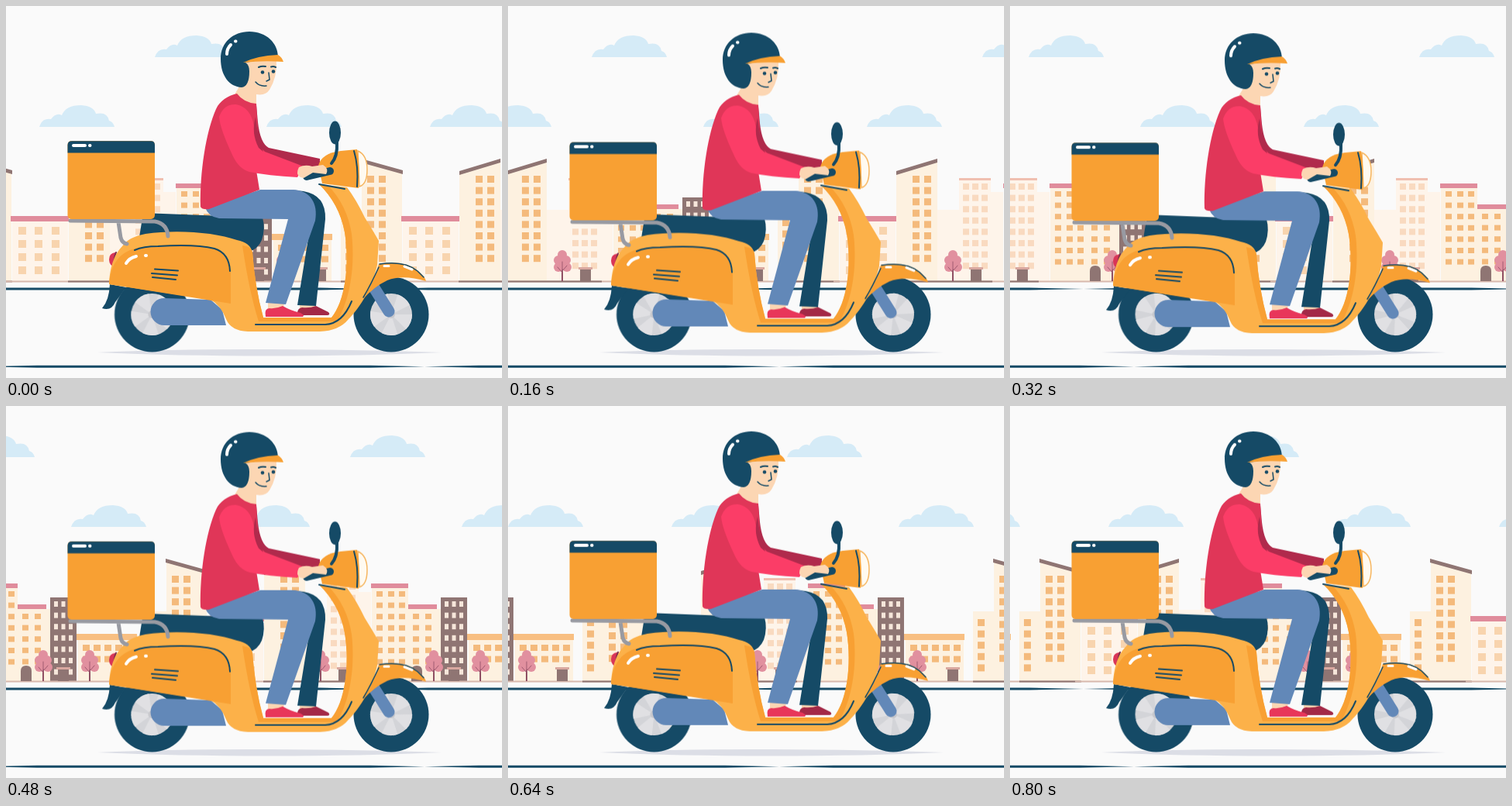
Animation of 640 by 480 pixels, one loop 960 ms. Source, as an HTML page:

```html
<!DOCTYPE html>
<html lang="en">
<head>
<meta charset="utf-8">
<title>Scooter delivery</title>
<style>
  html, body { margin: 0; width: 100%; height: 100%; overflow: hidden; background: #fafafa; }
  svg { display: block; width: 640px; height: 480px; }
  .line { fill: none; stroke-linecap: round; stroke-linejoin: round; }
  .navy { fill: #154a66; }
  .ink { stroke: #154a66; stroke-width: 2; }
  .shine { stroke: #fff; stroke-width: 4; }
  .amber { fill: #f8a033; }
  .gold { fill: #fcb149; }
  .skin { fill: #fcd6b3; }
  .blue { fill: #6288b8; }
</style>
</head>
<body>
<svg viewBox="0 0 640 480">
  <g id="town"></g>
  <g id="road"></g>
  <path d="M118 447Q220 442.500 340 443T562 447Q460 451.500 340 451.500T118 447Z" fill="#dcdee6"/>

  <g id="wheels"></g>

  <g id="rider">
    <!-- mudguard, exhaust, fork -->
    <path class="navy" d="M134 359Q133 380 124 390Q136 394 141 382L155 363Z"/>
    <path class="blue" d="M204 377L264 379L279 392L284 412H204A17.5 17.5 0 0 1 204 377Z"/>
    <path class="line" d="M474 362L494 394" stroke="#6288b8" stroke-width="15"/>

    <!-- far arm and far leg -->
    <path d="M323 128L325 150Q328 177 339 183L405 197V209L378 208L320 192Z" fill="#b02a4c"/>
    <path class="skin" d="M379 383H399V394H379Z"/>
    <path d="M376 399Q375 390 382 389Q392 390 400 387Q408 391 416 395Q419 398 415 399Z" fill="#a32947"/>
    <path class="navy" d="M366 237L384 239Q413 244 412 275L400 387L376 386L390 300Z"/>

    <!-- seat and body -->
    <path class="navy" d="M177 267L331 273Q335 287 330 302Q325 314 313 317L172 298Z"/>
    <path d="M141 318Q133 319 133 327T141 337Z" fill="#d93557"/>
    <path d="M142 318Q138 327 141 337" class="line" stroke="#7c2e48" stroke-width="2"/>
    <path class="gold" d="M133 359C134 334 141 319 150 310Q158 298 180 294C220 288 270 292 298 302Q315 305 318 318Q321 362 332 402H420C437 382 444 335 437 292Q430 255 404 230L440 234Q452 250 463 273Q473 289 481 303L479 334C473 362 458 388 442 404Q430 419 405 420H312Q290 419 284 404Q277 386 264 379Z"/>
    <path class="amber" d="M305 309Q317 310 318 318Q321 362 332 402H420C437 382 444 335 437 292Q430 255 404 230L416 232Q440 257 446 294C451 338 443 381 427 407H326Q314 370 305 309Z"/>
    <path class="amber" d="M133 359C135 335 145 314 177 311Q237 303 270 313Q288 319 290 345V384Z"/>
    <path class="line ink" d="M166 315Q177 310 196 310Q245 307 269 313Q288 319 289 342"/>
    <path class="line ink" d="M192 339.500L222 341.500M188 345L221 347.500M189 350L219 353"/>
    <path class="line shine" d="M155 332Q159 325 168 323M180 322h1"/>
    <path class="line ink" d="M322 411H412Q434 410 446 381"/>

    <!-- front fender -->
    <path class="amber" d="M461 378Q473 360 481 333Q515 327 533 343Q541 350 542 355Q512 346 492 354Q475 362 461 378Z"/>
    <path class="line ink" style="stroke-width:1.500" d="M481 337Q470 361 461 376M482 333Q514 328 531 342L539 350"/>
    <path class="line shine" style="stroke-width:3" d="M488 335.500h6M514 336l10 4"/>

    <!-- shoe, leg, torso -->
    <path class="skin" d="M338 381L359 384L357 393H338Z"/>
    <path d="M335 401Q333 390 340 390Q348 391 357 387Q367 393 380 396Q386 399 383 401Z" fill="#e8365a"/>
    <path class="blue" d="M257 260L328 237H370C393 238 403 255 399 277L361 385L335 383L364 275L275 274Q261 272 257 260Z"/>
    <path class="skin" d="M308 70H349Q350 92 340 108Q335 116 323 114V128Q304 127 295 114L304 99Z"/>
    <path d="M298 113C286 116 276 122 271 133C258 162 250 215 251 259Q253 263 262 262L327 237L322 206L325 165L323 126Q307 125 298 113Z" fill="#e03658"/>
    <path d="M297 127Q316 131 320 155Q322 178 334 188L384 207L376 221Q338 219 314 214Q300 210 292 192Q276 158 275 143Q281 126 297 127Z" fill="#fb3d67"/>
    <path d="M322 143Q316 164 326 183L332 188Q325 171 322 143Z" fill="#b02a4c"/>

    <!-- headlamp, mirror, grip -->
    <path d="M454 187Q466 192 466 211T456 233Z" fill="#fffaf0" stroke="#f6b660" stroke-width="1.500"/>
    <path class="amber" d="M403 206Q407 190 432 187L453 185Q457 209 455 235L408 229Z"/>
    <path class="line ink" d="M449 187Q455 207 453 233M404 230L437 236"/>
    <path class="line ink" style="stroke-width:4" d="M427 176Q428 194 420 203"/>
    <ellipse class="navy" cx="424.500" cy="163.500" rx="7.500" ry="15"/>
    <path class="line ink" style="stroke-width:10" d="M388 220L418 213"/>
    <path class="skin" d="M378 208Q386 204 395 207L409 205Q417 210 413 217L396 215L384 222Q372 220 378 208Z"/>

    <!-- head -->
    <path class="navy" d="M277 68C277 47 293 33 314 33C336 33 351 48 351 66L309 73Q314 76 314 84Q314 104 304 105C288 104 277 90 277 68Z"/>
    <path class="amber" d="M306 73Q324 64 351 63Q356 66 358 72Q331 70 306 73Z"/>
    <path class="line shine" d="M285 62Q285 55 290 50M296 45.500h.5"/>
    <g class="navy"><circle cx="331" cy="85.500" r="2.300"/><circle cx="345" cy="84.500" r="2.300"/></g>
    <path class="line ink" d="M326 79Q330 77 335 78M342 78.500Q345 77.500 348 79"/>
    <path class="line ink" style="stroke-width:1.500" d="M339 86L340 95L336 97M322 98Q327 104 336 103"/>

    <!-- delivery box -->
    <path class="line" d="M145 279L148 299Q150 306 156 307M83 277L192 278Q208 281 209 297" stroke="#989aa2" stroke-width="5"/>
    <rect class="amber" x="79.500" y="174" width="112.500" height="101" rx="5"/>
    <path class="navy" d="M79.500 189.500V179.500Q79.500 174.300 85 174.300H187Q192 174.300 192 179.500V189.500Z"/>
    <path class="line shine" d="M87 180H102M108 180h.5"/>
  </g>
</svg>

<script>
const LOOP = 960, TOWN = 504, ROAD = 570;
const CREAM = '#fdf1e0', PALE = '#fef4ea', TAN = '#f4ba7c', BROWN = '#8f7573', ROSE = '#e08c9c';
const $ = id => document.getElementById(id);

const rect = (x, y, w, h, fill) => `<rect x="${x}" y="${y}" width="${w}" height="${h}" fill="${fill}"/>`;
const poly = (d, fill) => `<path d="${d}" fill="${fill}"/>`;
const block = (x, y, w, fill = CREAM) => rect(x, y, w, 356 - y, fill);
const windows = (xs, y, rows, w = 9, h = 9, fill = TAN, step = 14.6) =>
  xs.map(x => Array.from({ length: rows }, (_, i) => rect(x, y + i * step, w, h, fill)).join('')).join('');

const cloud = (x, y) => `<g transform="translate(${x} ${y})">` +
  poly('M0 28Q4 16 15 18Q22 9 29 13Q34 0 54 0Q70 1 73 11Q88 8 90 20Q95 21 97 28Z', '#d5ebf7') + '</g>';

const tree = x => rect(x - 1, 335, 2, 20, '#8e4f63') +
  [[0, 321, 6], [-5, 328, 6], [5, 328, 6], [-5, 337, 6], [6, 337, 6], [0, 334, 5]]
    .map(([dx, y, r]) => `<circle cx="${x + dx}" cy="${y}" r="${r}" fill="#e1909f"/>`).join('') +
  `<path class="line" d="M${x} 344l-6-7M${x} 342l6-7M${x} 342v-12" stroke="#a05a70"/>`;

const door = x => rect(x - 9, 337, 18, 3, '#d9a8a0') + rect(x - 7, 340, 14, 15, BROWN);
const arch = x => poly(`M${x - 7} 355V342Q${x - 7} 335 ${x} 335T${x + 7} 342V355Z`, BROWN);

const street = [
  cloud(192, 38), cloud(43, 128), cloud(336, 128),
  // pink-roofed house
  block(8, 277, 72, PALE), rect(6, 271, 75, 7, ROSE),
  windows([16, 37, 59], 285, 4, 10, 10, '#f8d4ae', 17),
  // tower rising to the right, with annex
  block(134, 263, 28, PALE),
  poly('M81 216L134 201V356H81Z', CREAM), poly('M81 213L134 197V202L81 218Z', BROWN),
  windows([102, 117], 219, 8),
  // pale block of flats
  block(203, 240, 16, PALE),
  block(162, 223, 41, PALE), rect(162, 222, 41, 3, '#f0bfb0'),
  windows([167, 179, 191], 229, 8, 8, 8, '#f9dac0'),
  // stepped house
  block(267, 262, 42), rect(267, 256, 37, 6, ROSE),
  block(220, 235, 47), rect(219, 229, 48, 6, ROSE),
  windows([226, 241, 255], 239, 7, 8, 7),
  windows([273, 289], 268, 5, 8, 7),
  // dark flats
  block(309, 247, 34, BROWN),
  windows([314, 323.5, 333], 252, 7, 5, 7, '#f6e6da'),
  // low house with orange roof
  block(345, 302, 75), rect(343, 294, 78, 8, '#f8bf82'),
  windows([351, 365, 379, 393, 407], 308, 2, 9, 8),
  // tower falling to the right, with annex
  block(432, 265, 28), windows([438], 275, 5),
  poly('M459 201L511 216V356H459Z', CREAM), poly('M458 197L512 212V217L458 202Z', BROWN),
  windows([466, 481], 219, 8),
  rect(0, 354.5, 504, 2, '#d8b9ae'), rect(432, 354.5, 80, 2, BROWN), rect(80, 354.5, 125, 2, BROWN),
  door(184), door(326), door(406), arch(278),
  [154, 300, 360].map(tree).join('')
].join('');

$('town').innerHTML = [-1, 0, 1, 2].map(k => `<g transform="translate(${k * TOWN})">${street}</g>`).join('');

const dash = (x, y) => poly(`M${x} ${y}l70-1.500h430l70 1.500l-70 1.500h-430Z`, '#154a66');
$('road').innerHTML = [-1, 0, 1].map(k => dash(475 + k * ROAD, 365) + dash(540 + k * ROAD, 465.3)).join('');

const sector = a => `<path d="M0 0L27 0A27 27 0 0 1 19.100 19.100Z" fill="#e0e0e3" transform="rotate(${a})"/>`;
$('wheels').innerHTML = [188.5, 497].map(x => `<g transform="translate(${x} 398)">
  <circle class="navy" r="48.500"/><circle r="27" fill="#d3d4d8"/>
  <g class="spokes">${[0, 72, 144, 216, 288].map(sector).join('')}</g>
  <circle r="5" fill="#c6c7cc"/></g>`).join('');

const play = (el, frames, steps, duration = LOOP) =>
  el.animate(frames, { duration, iterations: Infinity, easing: steps ? `steps(${steps}, end)` : 'linear' });
const slide = distance => [{ transform: 'translateX(0)' }, { transform: `translateX(${-distance}px)` }];

play($('town'), slide(TOWN), 6);
play($('road'), slide(ROAD), 3, LOOP / 2);
document.querySelectorAll('.spokes').forEach(el =>
  play(el, [{ transform: 'rotate(0deg)' }, { transform: 'rotate(144deg)' }], 6));

const bob = [0, 1.5, 2.2, 0.6, -0.3, -0.2, 0];
play($('rider'), bob.map((y, i) => ({ transform: `translateY(${y}px)`, offset: i / 6, easing: 'steps(1, end)' })));
</script>
</body>
</html>
```
